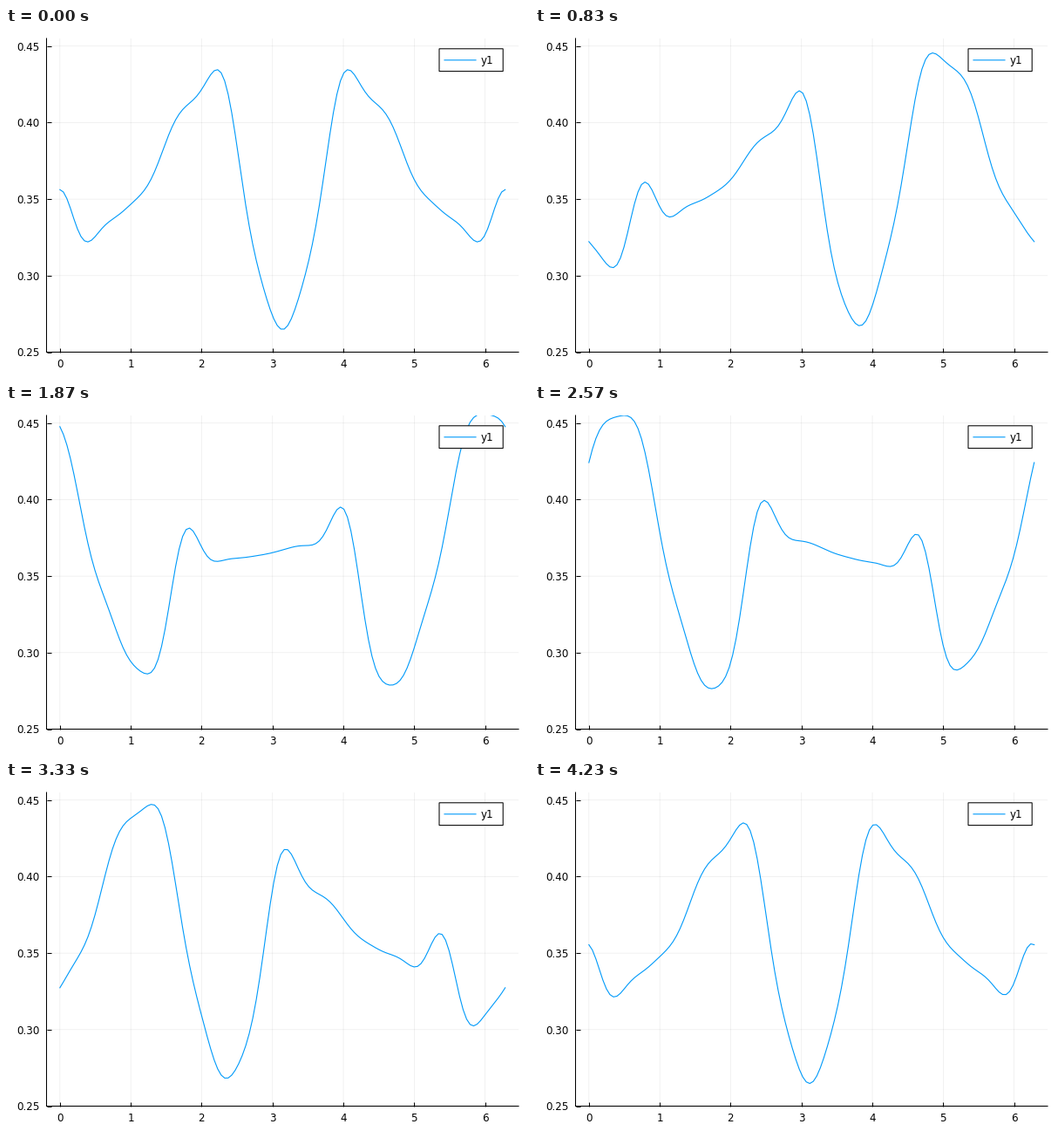
A matplotlib script for the animation above (4.26 s loop, 600x400 px).

```python
import numpy as np
import matplotlib.pyplot as plt
from matplotlib.animation import FuncAnimation
from matplotlib.patches import Rectangle

STEPS, LOOP_MS = 128, 4260
BLUE = "#009afa"
MEAN = 0.3597

# Travelling waves a cos(n x - m t): n cycles in space, m in time.
WAVES = [
    (1, 0, 0.0030), (1, 1, -0.0108),
    (2, 0, 0.0013), (2, 1, -0.0490), (2, 2, 0.0020),
    (3, 2, 0.0410),
    (4, 2, -0.0085), (4, 3, -0.0050),
    (5, 3, 0.0077),
    (6, 3, -0.0030), (6, 4, 0.0060),
    (8, 5, 0.0070),
    (9, 6, 0.0010),
    (11, 7, 0.0030),
    (13, 8, 0.0008),
]

plt.rcParams.update({"font.family": "DejaVu Sans", "font.size": 8.6,
                     "path.snap": False})

x = np.linspace(0, 2 * np.pi, STEPS)


def height(step):
    t = 2 * np.pi * step / STEPS
    return MEAN + sum(a * np.cos(n * x - m * t) for n, m, a in WAVES)


fig = plt.figure(figsize=(6, 4), dpi=100, facecolor="white")
left, right, top, bottom = 46.5, 588, 12, 371.5
ax = fig.add_axes([left / 600, 1 - bottom / 400,
                   (right - left) / 600, (bottom - top) / 400])
pad = 0.03 * 2 * np.pi
ax.set(xlim=(-pad, 2 * np.pi + pad), ylim=(0.25, 0.455),
       xticks=range(7), yticks=np.arange(0.25, 0.451, 0.05))
ax.yaxis.set_major_formatter("{x:.2f}")
ax.spines[["top", "right"]].set_visible(False)
ax.spines[["left", "bottom"]].set_linewidth(0.75)
ax.tick_params(direction="in", length=3.4, width=0.75)
ax.tick_params(axis="x", pad=5.2)
ax.tick_params(axis="y", pad=5.8)
ax.grid(color="black", alpha=0.08, linewidth=0.5)
ax.set_axisbelow(True)
curve, = ax.plot(x, height(0), color=BLUE, lw=0.8)

# Legend, laid out in pixels.
page = fig.add_axes([0, 0, 1, 1])
page.set(xlim=(0, 600), ylim=(400, 0))
page.axis("off")
page.add_patch(Rectangle((497, 23.8), 73.2, 25.8,
                         fc="white", ec="black", lw=0.75))
page.plot([503, 539], [36.8, 36.8], color=BLUE, lw=0.8)
page.text(544.6, 41, "y1")


def draw(step):
    curve.set_ydata(height(step))
    return curve,


anim = FuncAnimation(fig, draw, frames=STEPS, interval=LOOP_MS / STEPS,
                     repeat=True, repeat_delay=0)
plt.show()
```
